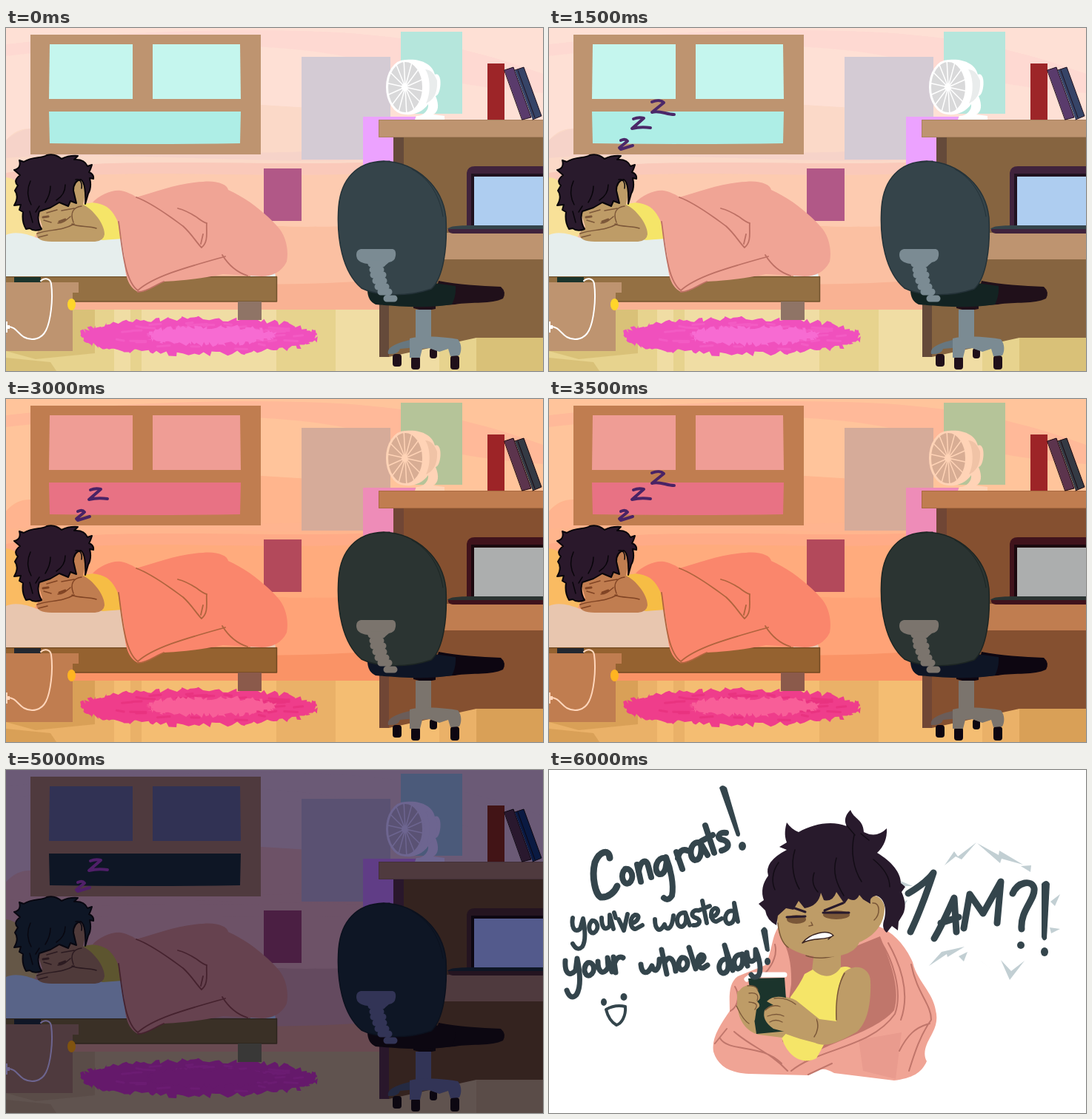
An HTML page that plays this animation: 725x464 px, repeating every 8 s.

```html
<!DOCTYPE html>
<html lang="en">
<head>
<meta charset="utf-8">
<title>Sleeping the day away</title>
<style>
html, body { margin: 0; width: 100%; height: 100%; overflow: hidden; background: #fff; }
svg { display: block; width: 725px; height: 464px; }
path, line, ellipse { stroke-linecap: round; stroke-linejoin: round; }
</style>
</head>
<body>
<svg id="stage" viewBox="0 0 725 464" xmlns="http://www.w3.org/2000/svg"></svg>
<script>
// Each part has a colour for day, sunset and night.
const tones = {
  wall: ['#fee0d5', '#ffc49b', '#6b5a76'],
  haze: ['#fed9d2', '#ffb999', '#6b5a76'],
  hill: ['#fbd9c8', '#ffb58d', '#6d5267'],
  mist: ['#f6d3c9', '#ffb48f', '#6d5267'],
  stripe: ['#fac9ba', '#ffab87', '#6d5267'],
  glow: ['#fdcbb0', '#ffab7d', '#6d5267'],
  low: ['#fbc0a2', '#ffa377', '#644a5f'],
  base: ['#f9b293', '#fa9366', '#694a51'],
  floor: ['#f0dda4', '#f4bd72', '#60534f'],
  plank: ['#e7d38e', '#eab168', '#60534f'],
  plankDark: ['#d9c178', '#d9a057', '#5a4c48'],
  wood: ['#be9470', '#c07d50', '#4f3a3e'],
  woodEdge: ['#a98260', '#a96a40', '#44313a'],
  back: ['#866440', '#855030', '#34231f'],
  side: ['#654a3a', '#704635', '#29172b'],
  pane: ['#c5f6ee', '#ef9d95', '#313254'],
  paneLow: ['#aeeee6', '#e87284', '#0e1625'],
  posterA: ['#d4cbd4', '#d6ab99', '#5a5172'],
  posterB: ['#b5e6dc', '#b5c499', '#4b5a7a'],
  posterC: ['#eca2ff', '#ee8cb8', '#603d86'],
  posterD: ['#b15887', '#b3495b', '#4b1f43'],
  red: ['#9d2528', '#9d2427', '#421416'],
  purple: ['#5a3b6c', '#5c344d', '#29182e'],
  navy: ['#364467', '#343a44', '#0a1a42'],
  fan: ['#ffffff', '#ffd3b6', '#6d6590'],
  fanShade: ['#e9ecec', '#f0c3a6', '#6d6590'],
  fanFace: ['#d9d9da', '#d8ad94', '#5a5274'],
  frame: ['#40233c', '#40131c', '#241420'],
  frameIn: ['#20121f', '#1b080e', '#0d0711'],
  screen: ['#aecdf0', '#acaeae', '#535a8c'],
  chair: ['#35444a', '#2b3432', '#0e1625'],
  chairEdge: ['#243238', '#1c2523', '#0b111e'],
  seat: ['#132322', '#0e1525', '#0c0711'],
  seatEnd: ['#20101a', '#0d0611', '#0c0711'],
  metal: ['#7b8b93', '#7b746d', '#323456'],
  metalDark: ['#677780', '#6b5d59', '#242a42'],
  sheet: ['#e6eeed', '#e8c6af', '#596488'],
  bed: ['#947043', '#956230', '#3a3026'],
  bedEdge: ['#71522c', '#714820', '#2c241e'],
  leg: ['#8f7466', '#8b5a4b', '#393837'],
  pillow: ['#f8e198', '#fabb62', '#655747'],
  cover: ['#f0a495', '#fa866c', '#66424f'],
  crease: ['#bd7064', '#b0643e', '#45222e'],
  skin: ['#be9c67', '#c07d50', '#4f3a3a'],
  skinLine: ['#7c5739', '#804424', '#2b1a20'],
  shirt: ['#f5e568', '#f6bd45', '#5d552f'],
  hair: ['#291a2c', '#2a182b', '#0e1625'],
  hairLine: ['#08050a', '#08050a', '#080710'],
  phone: ['#1b342c', '#232830', '#101626'],
  cord: ['#ffffff', '#ffd6bb', '#6d6590'],
  knob: ['#ffd52a', '#ffb421', '#80530f'],
  rug: ['#f050bd', '#ef3d8b', '#65196b'],
  rugLight: ['#f76bd2', '#f85e98', '#65196b'],
  rugMark: ['#f35bc4', '#e93380', '#6b1c72'],
  snore: ['#4b2869', '#492365', '#501f69']
};

const stage = document.getElementById('stage');
const sheet = document.createElement('style');
sheet.textContent = Object.keys(tones).map(k =>
  `.${k}{fill:var(--${k})}.line-${k}{fill:none;stroke:var(--${k})}`).join('');
document.head.append(sheet);

const shape = (tone, d, extra = '') => `<path class="${tone}" d="${d}" ${extra}/>`;
const line = (tone, d, w = 2) => `<path class="line-${tone}" d="${d}" stroke-width="${w}"/>`;
const box = (tone, x, y, x2, y2, r = 0) =>
  `<rect class="${tone}" x="${x}" y="${y}" width="${x2 - x}" height="${y2 - y}" rx="${r}"/>`;
const fill = (color, d) => `<path fill="${color}" d="${d}"/>`;
const pen = (color, w, d) => `<path fill="none" stroke="${color}" stroke-width="${w}" d="${d}"/>`;
const oval = (attrs, x, y, rx, ry) => `<ellipse ${attrs} cx="${x}" cy="${y}" rx="${rx}" ry="${ry}"/>`;

let seed = 7;
const random = () => (seed = seed * 16807 % 2147483647) / 2147483647;

function fuzzy(tone, cx, cy, rx, ry, rough) {
  let d = '';
  for (let i = 0; i < 170; i++) {
    const a = i / 170 * Math.PI * 2;
    const c = Math.cos(a), s = Math.sin(a);
    const x = cx + rx * c + (random() - .5) * rough;
    const y = cy + ry * Math.sign(s) * Math.abs(s) ** .9 + (random() - .5) * rough;
    d += `${i ? 'L' : 'M'}${x.toFixed(1)} ${y.toFixed(1)}`;
  }
  return shape(tone, d + 'Z');
}

function rug() {
  let tufts = '';
  for (let i = 0; i < 34; i++) {
    const a = random() * 6.28, r = .6 + random() * .28;
    const x = 260 + 150 * r * Math.cos(a), y = 417 + 21 * r * Math.sin(a);
    tufts += line('rugMark', `M${x.toFixed(1)} ${y.toFixed(1)}l${(8 + random() * 14).toFixed(1)} ${(random() * 4 - 2).toFixed(1)}`, 3);
  }
  return fuzzy('rug', 260, 417, 159, 24, 7) + tufts + fuzzy('rugLight', 277, 416, 86, 12, 7);
}

const wall = box('wall', 0, 0, 725, 464) +
  shape('haze', 'M0 22C120 8 260 0 400 4C560 8 650 35 725 62V130H0Z') +
  shape('wall', 'M0 38C160 18 380 16 480 44C590 74 650 82 725 88V140H0Z') +
  shape('hill', 'M0 152C10 140 20 136 33 136C150 110 290 100 345 104L410 108C450 110 490 116 530 128V381H0Z') +
  shape('mist', 'M0 152C16 138 28 136 40 136L180 160C280 180 390 160 530 170V381H0Z') +
  shape('hill', 'M0 176C140 164 360 188 530 176V381H0Z') +
  shape('stripe', 'M0 196C150 170 330 190 530 180V381H0Z') +
  shape('glow', 'M0 210C150 184 350 208 530 194V381H0Z') +
  shape('low', 'M0 268H372C405 270 435 268 530 268V381H0Z') +
  shape('base', 'M0 350C150 330 320 360 530 338V381H0Z');

const floor = box('floor', 0, 381, 725, 464) + box('plankDark', 0, 381, 120, 464) +
  box('plank', 120, 381, 183, 464) + box('floor', 146, 381, 168, 464) +
  box('plank', 365, 381, 445, 464) + box('plank', 585, 410, 635, 464) + box('plankDark', 635, 410, 725, 464) +
  shape('plank', 'M0 437L40 448L120 440V464H68L60 452L0 446Z');

const windowAndPosters = box('wood', 33, 9, 344, 171) +
  shape('pane', 'M59 22H171V96H58Z') + shape('pane', 'M198 22H316L317 96H198Z') +
  shape('paneLow', 'M58 113H317L316 156Q190 158 59 156Z') +
  box('posterA', 399, 39, 519, 178) + box('posterB', 533, 5, 616, 116) +
  box('posterC', 482, 120, 553, 200) + box('posterD', 348, 190, 399, 261);

function fan() {
  let spokes = '';
  for (let i = 0; i < 14; i++) {
    const a = i * Math.PI / 7 + .15;
    spokes += `M539 80L${(539 + 24 * Math.cos(a)).toFixed(1)} ${(80 + 35 * Math.sin(a)).toFixed(1)}`;
  }
  return shape('fan', 'M540 43C560 41 576 49 579 63C590 58 588 91 580 92C585 104 584 113 577 117L592 119V124H552L554 119C564 119 571 111 570 103C563 113 552 118 539 117Z') +
    shape('fanShade', 'M566 56C573 66 574 88 567 102C576 98 583 90 582 71C578 62 575 57 566 56Z') +
    oval('class="fanFace"', 539, 80, 25, 36) + line('fan', spokes, 1.5) +
    oval('class="line-fan" stroke-width="3"', 539, 80, 24.5, 35.5) + oval('class="fan"', 538, 80, 4, 5);
}

const desk = box('back', 523, 148, 725, 280) + box('side', 523, 148, 537, 280) +
  shape('back', 'M517 313H725V419H635L517 445Z') + box('side', 504, 330, 517, 445) +
  box('wood', 503, 124, 725, 148) + line('woodEdge', 'M725 124.500H503.500V147.500H725', 1) +
  box('wood', 570, 277, 725, 313) +
  box('red', 650, 48, 673, 124) +
  shape('purple', 'M673 57L685 53L709 121L697 124Z') + line('frameIn', 'M673 57L685 53L709 121L697 124Z', 1) +
  shape('navy', 'M687 57L699 53L723 119L711 124Z') + line('frameIn', 'M687 57L699 53L723 119L711 124M691 57L714 121', 1) +
  shape('frame', 'M622 270V196Q623 187 633 187H725V270Z') + shape('frameIn', 'M628 268V197H725V268Z') +
  box('screen', 632, 201, 725, 267) +
  shape('frame', 'M597 272H725V278H603Q596 277 597 272Z') +
  shape('chair', 'M596 272C600 267 615 267 640 267H725V272Z');

const chair =
  shape('seatEnd', 'M550 371H580V380Q565 384 550 379Z') + box('metal', 553, 381, 574, 430) +
  shape('metalDark', 'M516 441C514 432 525 426 554 420V432L532 434Q530 442 516 441Z') +
  [[522, 441, 458], [547, 444, 462], [572, 433, 447], [600, 443, 462]].map(([x, y, b]) => box('seatEnd', x, y, x + 12 - (x === 572) * 2, b, 4)).join('') +
  shape('metal', 'M545 420C565 415 598 419 610 421C616 428 615 438 612 443L600 444L597 434L585 438L571 433L562 434L559 446H545Z') +
  shape('seatEnd', 'M584 342C610 347 640 349 668 350Q676 357 671 366C655 374 630 370 606 374L575 376Z') +
  shape('seat', 'M488 354C510 365 545 361 578 345L607 349Q608 362 602 374C565 380 525 376 499 374Q488 369 488 354Z') +
  shape('chair', 'M510 180C473 181 452 205 449 242C446 285 454 330 480 352C505 364 545 363 574 353C591 338 596 295 594 257C590 215 555 182 510 180Z') +
  line('chairEdge', 'M510 180C473 181 452 205 449 242C446 285 454 330 480 352C505 364 545 363 574 353C591 338 596 295 594 257C590 215 555 182 510 180Z', 1.5) +
  line('chairEdge', 'M497 182L518 180M548 191C574 205 586 230 590 255', 1) +
  shape('metal', 'M479 299H522Q527 300 526 308Q525 316 517 317L511 322L488 319Q473 317 473 307Q473 300 479 299Z') +
  line('metal', 'M493 319H508M495 327H506M496 334H509M499 342H510M502 350H513M506 357H517M514 366H524', 9);

const bedroomFront = box('bed', 0, 336, 366, 370) + line('bedEdge', 'M0 336.500H365.500V370H90', 1.5) + box('leg', 313, 370, 345, 395) +
  shape('pillow', 'M0 202Q13 203 22 216L45 270L38 284H0Z') +
  shape('sheet', 'M0 280C12 274 30 279 42 284H157L164 336H0ZM330 328L363 331L364 336H330Z') +
  box('wood', 0, 344, 98, 358) + box('wood', 0, 358, 90, 437) + box('phone', 11, 337, 47, 344) +
  line('cord', 'M47 342C52 337 60 339 61 346C64 368 60 397 54 409C48 421 35 424 24 418C15 412 13 404 2 404') +
  shape('cord', 'M0 397H2V402H5V407H2V412H0Z') + oval('class="knob"', 88.500, 374, 5.500, 8);

const sleeper =
  shape('shirt', 'M88 244C110 234 132 234 142 242C151 254 155 268 157 285L130 287L90 268Z') +
  shape('skin', 'M88 205C97 197 109 204 108 220L104 239C116 244 133 264 133 279Q132 288 120 289L62 289Q41 289 41 278L49 269L43 250L65 238L90 235Z') +
  line('skinLine', 'M91 263C86 250 91 242 102 241M89 265C98 270 112 267 122 271M42 278C58 272 75 275 92 265M44 283L56 280M51 260L61 263M70 264C78 264 82 259 87 255M55 250L69 246M75 247L92 244', 1.5) +
  line('skinLine', 'M50 256L57 255M72 262L80 259', 3) +
  shape('hair', 'M18 179L24 181C36 173 48 177 55 172Q66 169 75 177Q85 172 97 173L92 178Q106 177 110 187L116 185Q114 192 112 195Q119 198 118 204L113 203Q116 216 111 224L107 238C108 222 106 208 101 205Q91 207 91 220L95 237L87 234L84 241L72 236L60 243L45 248Q41 260 48 272Q38 276 32 271L27 272Q21 262 23 249L18 246L20 239L11 240Q18 228 12 220L16 213Q9 207 19 199L11 192Q21 190 18 179Z', 'stroke="var(--hairLine)" stroke-width="2"') +
  line('hairLine', 'M33 207C27 220 30 232 34 239M53 236C58 228 60 220 60 214M68 233C76 228 80 220 80 212M94 205C101 203 103 211 102 217M32 248L36 263M45 241L40 249', 1.5) +
  shape('cover', 'M117 236C125 226 145 218 155 220C165 222 172 226 176 229C200 222 235 209 266 208C285 206 299 212 300 219C325 230 350 250 366 268C378 280 382 300 379 316C372 330 360 336 345 336L293 333C260 340 230 342 213 343C200 348 190 358 178 357C165 350 160 335 160 310C156 290 156 275 150 260C143 245 135 238 117 236Z') +
  line('crease', 'M176 229C200 238 225 258 239 268C251 279 257 290 264 297C274 289 270 275 271 264C262 262 255 250 232 244M152 262C157 298 160 342 178 355C200 335 250 322 296 309M266 279L263 292M292 307C300 320 310 330 326 335M178 357C191 357 202 347 213 343', 1.8);

const snores = ['M97 152Q103 149 106 153L95 162L97 164L113 159', 'M114 123Q121 120 128 122L112 136Q124 133 137 135', 'M139 100C146 97 152 98 155 101L139 114C150 111 158 117 169 117'];

const ink = '#34454c';
const lettering =
  pen(ink, 9, 'M82 119C81 106 68 110 62 125C57 145 63 169 70 172C80 173 89 165 92 157') +
  pen(ink, 8, 'M103 134C95 141 100 157 108 153C116 147 112 132 103 134M119 128L124 151M121 137C124 121 132 120 134 130L138 145M158 119C145 116 140 137 149 141C157 142 160 127 158 118C164 133 169 155 166 170Q161 178 155 173M172 111L180 134M174 119Q177 105 187 109M202 98C190 97 188 119 197 122C206 122 207 106 204 98L214 115M211 75L223 112M206 96L221 88M239 85C230 83 225 92 233 94C244 96 245 106 233 109') +
  fill(ink, 'M230 24Q234 18 240 24L258 86Q258 92 253 89Z') + oval(`fill="${ink}"`, 261, 103, 5, 6) +
  pen(ink, 6, 'M32 200C30 212 34 221 42 215L46 201C49 217 50 231 45 239Q38 246 32 235M58 204C51 211 55 223 61 220C69 215 65 202 58 204M71 200C71 212 75 219 82 211L82 196L87 215M88 193L90 200M94 202L101 217L106 195M111 208C121 205 124 195 116 196C108 200 109 215 117 215L126 210M143 202C143 215 149 222 156 209C158 218 166 217 168 197M183 193C171 192 170 212 179 212C186 210 186 199 184 193L190 210M202 190C193 188 190 198 198 200C206 202 204 211 195 210M207 177L213 207M202 190L217 184M219 199C229 197 231 187 224 187C216 190 218 205 226 205L233 201M249 191C238 187 234 206 243 208C252 207 252 195 250 180L255 205') +
  pen(ink, 7, 'M22 258C21 274 27 281 36 271L38 255C42 274 44 293 37 304Q29 312 24 298M52 261C45 267 48 280 55 278C64 273 61 258 52 261M66 259C66 273 73 279 80 267L79 254L85 273M87 253L90 274M88 263Q92 250 100 254M124 263C125 276 133 278 139 265C142 276 149 271 149 256M152 243L159 276M156 261C162 248 169 256 171 272M179 254C172 260 175 273 182 270C190 266 188 252 179 254M189 240L198 269M201 262C210 259 212 250 205 250C198 254 201 269 208 268L214 264M241 256C229 253 226 273 235 275C244 274 244 262 237 237L248 271M260 250C248 248 247 267 255 269C263 267 262 256 261 249L268 265M267 247C268 259 273 262 279 255L279 243C285 258 287 270 283 278Q277 283 273 277') +
  fill(ink, 'M286 217Q291 208 295 217L298 244Q296 248 292 244Z') + oval(`fill="${ink}"`, 295, 259, 4, 5) +
  oval(`fill="${ink}"`, 74, 314, 4, 5) + oval(`fill="${ink}"`, 101, 307, 4.500, 5) +
  pen(ink, 4, 'M77 324Q89 317 103 320C104 333 98 343 91 345C84 341 79 332 77 324Z') +
  pen(ink, 9, 'M485 167C500 158 512 149 519 139C510 166 499 196 488 219M520 228C532 208 540 188 547 173L550 219M529 207L553 199M560 214L568 168L586 194L610 151L605 207M626 167C633 151 652 148 655 160C657 175 636 190 638 215') +
  fill(ink, 'M665 154Q672 146 676 154L672 228Q668 234 665 226Z') + oval(`fill="${ink}"`, 637, 237, 5, 5) + oval(`fill="${ink}"`, 669, 246, 5, 6);

const sparks = fill('#c2cfd3', 'M534 129L547 110L552 117L577 98L557 121L549 117ZM578 99L607 115L608 109L640 128L611 120L609 126ZM637 130L651 129L650 138ZM513 265L530 246L561 239L538 253L537 249ZM553 252L565 246L560 259ZM581 257L598 270L585 260ZM610 257L624 272L642 258L622 284ZM677 178L690 168L683 184ZM676 213L690 215L678 221ZM474 150L491 157L477 157ZM473 181L484 176L478 187Z');

const skin = '#be9c67', coral = '#f0a495', shade = '#c0766b', dark = '#281a2c', brown = '#7a5738';
const awake = '<rect width="725" height="464" fill="#fff"/>' + sparks +
  fill(coral, 'M313 207C299 226 303 242 292 264L255 279C241 289 244 310 244 326C231 345 219 363 222 381C228 401 245 410 270 411L350 413C365 402 373 403 385 410L466 420C490 417 503 410 510 394C502 380 514 364 518 355Q526 340 522 325C518 300 497 286 491 260C480 235 463 219 446 212Z') +
  fill(shade, 'M310 220C321 238 328 256 327 290L315 367L345 394C362 371 438 358 466 325C475 294 460 258 447 225L415 238L345 249Z') +
  fill('#e99b8e', 'M418 365L476 355L468 418L424 407Z') +
  pen(shade, 2, 'M305 236C310 254 295 276 280 284M245 326C257 319 257 303 251 293M231 363C242 382 288 370 314 397M250 354C275 376 298 381 322 407M327 407C365 376 435 376 467 330C478 300 464 254 445 228M458 234C481 275 485 310 475 338M489 263C497 303 516 316 516 338C500 360 492 388 486 407M514 343C495 348 484 358 473 380M240 350L224 370M350 412L382 397') +
  fill(skin, 'M358 245H394V278L374 291L354 280Z') +
  fill('#f5e568', 'M356 270C369 282 384 282 394 267Q404 264 412 271C394 291 391 319 388 341L361 390C342 400 321 387 314 361L326 307Q340 288 345 276Z') +
  fill(skin, 'M398 274C414 260 434 268 434 286C435 316 430 341 416 354C394 366 376 377 359 369C331 362 310 355 292 342L290 324C298 306 318 303 334 312L365 337L388 340C388 314 390 288 398 274Z') +
  pen(brown, 1.5, 'M399 275C389 292 387 315 388 338M361 337C365 345 362 356 358 361M347 251C363 257 381 254 394 248') +
  fill(skin, 'M276 291C260 289 251 301 255 317C254 337 266 354 283 358L315 362L326 350L305 300Z') +
  pen('#fff', 7, 'M267 283L275 277H318') +
  fill('#1b342c', 'M269 282L318 281L323 353L280 357Z') +
  fill(skin, 'M269 292Q281 292 282 299L284 303Q287 310 281 313Q288 319 280 324L278 338Q273 347 264 338L254 321V300ZM291 325Q297 319 303 318L294 313Q303 304 319 308L334 315L361 337L355 364L303 350Q287 339 291 325Z') +
  pen(brown, 1.3, 'M268 292Q279 290 282 298M270 302Q285 300 281 312M270 314Q285 315 278 324M292 325Q301 316 312 320M295 333Q308 328 317 333M298 341Q306 336 315 341M304 309Q320 307 333 317M253 319C259 332 264 340 270 343') +
  fill(skin, 'M308 183C307 215 311 232 322 239C338 250 356 253 374 253C397 253 414 246 419 233C439 225 454 208 453 184Q449 169 433 169L350 160Z') +
  pen(brown, 1.5, 'M309 207C311 226 317 236 323 240M437 180C448 179 447 196 439 203M354 206L356 210L351 211') +
  oval(`fill="${brown}"`, 334, 202, 13, 6) + oval(`fill="${brown}"`, 388, 196, 18, 6) +
  pen(dark, 3, 'M326 185L346 192M372 190L397 180M321 199L346 198M370 193L405 193') +
  fill('#fff', 'M342 234C352 221 376 215 384 224C374 231 357 226 342 234Z') +
  pen('#3a2420', 1.5, 'M342 234C352 221 376 215 384 224C374 231 357 226 342 234M382 225L377 229') +
  fill(dark, 'M311 104L321 98C317 88 319 78 321 71Q327 80 337 84C357 73 381 68 402 76Q396 65 407 54C412 67 424 66 425 84Q442 93 456 79Q457 99 443 112C463 124 475 139 475 153L481 158L476 165Q484 182 478 195L472 205L471 217L463 211L456 220Q448 214 453 201C457 184 450 171 441 170Q432 172 434 181L424 175L419 169Q414 180 404 174L399 181L388 165Q383 179 371 176L367 166Q364 184 345 187L337 177L330 189L320 187L309 197L307 210Q294 203 292 190L283 181L290 176Q284 159 296 143Q290 124 321 108Z') +
  pen('#120c15', 1.5, 'M332 108C325 130 332 151 338 161M412 88C407 111 411 134 422 151M388 119C382 139 389 155 398 170M310 125C300 139 301 153 305 162M358 139Q353 154 363 165M438 121Q460 139 460 158M421 86L432 95M402 75L413 88') +
  lettering;

stage.innerHTML = `<g id="bedroom">${wall}${floor}${windowAndPosters}${fan()}${desk}${chair}${rug()}${bedroomFront}${sleeper}` +
  snores.map(d => `<path class="line-snore snoring" d="${d}" stroke-width="4"/>`).join('') +
  `</g><g id="awake" aria-label="Congrats! you've wasted your whole day! 1AM?!">${awake}</g>`;

const bedroom = document.getElementById('bedroom');
const awakeScene = document.getElementById('awake');
const snoreMarks = [...document.querySelectorAll('.snoring')];
let lastStep = -1;

function render(ms) {
  const step = Math.floor(ms % 8000 / 500);
  if (step === lastStep) return;
  lastStep = step;
  const scene = Math.floor(step / 4);
  bedroom.style.display = scene < 3 ? '' : 'none';
  awakeScene.style.display = scene === 3 ? '' : 'none';
  if (scene === 3) return;
  for (const key in tones) stage.style.setProperty('--' + key, tones[key][scene]);
  snoreMarks.forEach((mark, i) => { mark.style.display = i < step % 4 ? '' : 'none'; });
}

const start = performance.now();
function tick() {
  render(performance.now() - start);
  requestAnimationFrame(tick);
}
tick();
</script>
</body>
</html>
```
